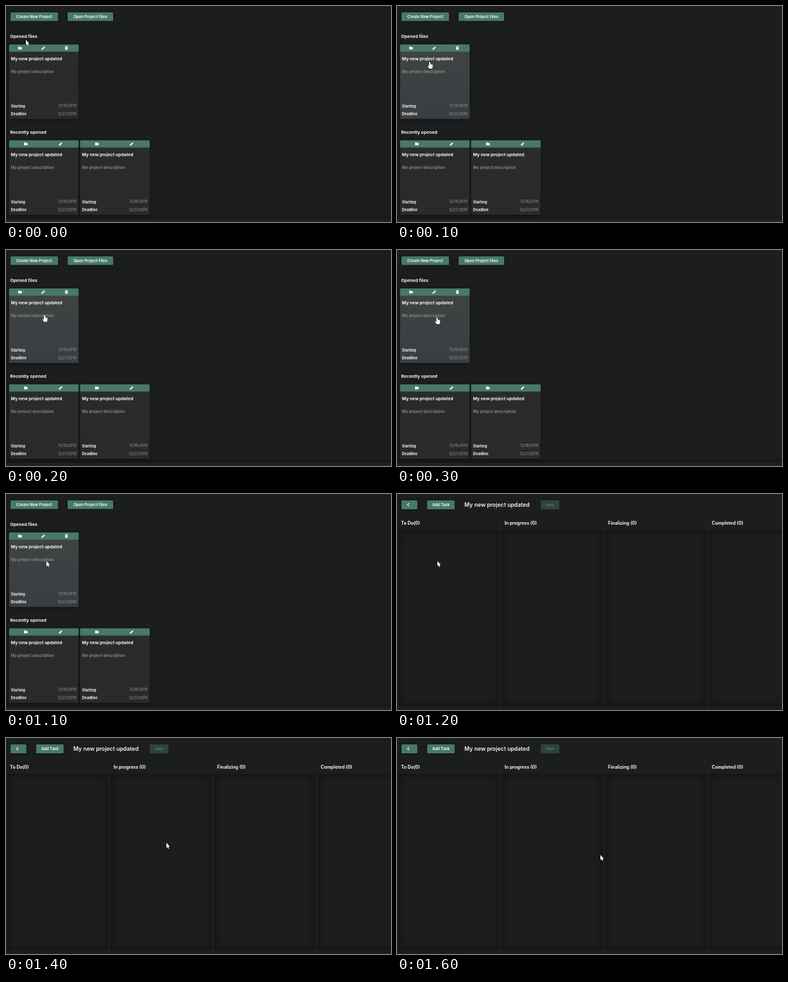
Write an HTML page with a canvas that moves like this. It is 600 px wide and 338 px high and loops after 1700 ms.

```html
<!DOCTYPE html>
<html lang="en">
<head>
<meta charset="utf-8">
<title>Project board</title>
<style>
html, body { margin: 0; width: 100%; height: 100%; overflow: hidden; background: #1c1d1e; }
canvas { display: block; width: 600px; height: 338px; }
</style>
</head>
<body>
<canvas id="stage"></canvas>
<script>
const W = 600, H = 338, LOOP = 1700;
const GREEN = '#477969', WHITE = '#f4f5f5', GREY = '#8b8e8f';
const canvas = document.getElementById('stage');
const ctx = canvas.getContext('2d');
const ratio = window.devicePixelRatio || 1;
canvas.width = W * ratio;
canvas.height = H * ratio;
ctx.scale(ratio, ratio);

// Pointer stops: time, x, y, shape
const stops = [
  [0, 31, 53, 'arrow'],
  [100, 51, 87.5, 'hand'],
  [200, 60, 102, 'hand'],
  [300, 62.5, 105.5, 'hand'],
  [1100, 63, 105, 'arrow'],
  [1300, 128, 129, 'arrow'],
  [1400, 250, 164, 'arrow'],
  [1500, 313, 180, 'arrow'],
  [1600, 317, 183, 'arrow']
];

function text(str, x, mid, size, color = WHITE, weight = 700, align = 'left') {
  ctx.font = `${weight} ${size}px Inter, "Open Sans", sans-serif`;
  ctx.fillStyle = color;
  ctx.textAlign = align;
  ctx.fillText(str, x, mid + size * 0.36);
}

function box(x, y, w, h, fill, r = 0) {
  ctx.fillStyle = fill;
  ctx.beginPath();
  ctx.roundRect(x, y, w, h, r);
  ctx.fill();
}

function shape(points, fill, x = 0, y = 0) {
  ctx.beginPath();
  for (let i = 0; i < points.length; i += 2) ctx.lineTo(x + points[i], y + points[i + 1]);
  ctx.closePath();
  ctx.fillStyle = fill;
  ctx.fill();
}

function shaded(blur, alpha, dy, draw) {
  ctx.save();
  ctx.shadowColor = `rgba(0,0,0,${alpha})`;
  ctx.shadowBlur = blur * ratio;
  ctx.shadowOffsetY = dy * ratio;
  draw();
  ctx.restore();
}

function fade(x0, y0, x1, y1, from, to) {
  const g = ctx.createLinearGradient(x0, y0, x1, y1);
  g.addColorStop(0, from);
  g.addColorStop(1, to);
  return g;
}

const icons = {
  folder(x, y) {
    shape([-2.8, -2.2, -0.5, -2.2, 0.2, -1.5, 2.8, -1.5, 2.8, 2.1, -2.8, 2.1], WHITE, x, y);
  },
  pencil(x, y) {
    shape([-2.7, 2.7, -2.7, 1.1, 0.8, -2.4, 2.4, -0.8, -1.1, 2.7], WHITE, x, y);
    shape([1.2, -2.7, 1.7, -3, 3, -1.7, 2.7, -1.2], WHITE, x, y);
  },
  trash(x, y) {
    box(x - 2.5, y - 2.6, 5, 1, WHITE);
    box(x - 0.9, y - 3, 1.8, 0.6, WHITE);
    box(x - 2, y - 1.3, 4, 4.1, WHITE, 0.5);
  }
};

function button(label, x, w, h = 13.6) {
  shaded(3, 0.45, 1, () => box(x, 10, w, h, GREEN, 1.5));
  if (label) text(label, x + w / 2, 16.7, 5.95, WHITE, 700, 'center');
}

function card(x, y, names, hover) {
  const w = 108.4, h = 116.5;
  const fill = hover ? fade(0, y, 0, y + h, '#404344', '#3b3e40')
                     : fade(0, y, 0, y + h, '#2a2b2c', '#292a2b');
  shaded(5, 0.5, 1, () => box(x, y, w, h, fill, 1.5));
  box(x, y, w, 11.3, GREEN, [1.5, 1.5, 0, 0]);
  const gap = w / names.length;
  names.forEach((name, i) => icons[name](x + gap * (i + 0.5) - 1, y + 5.6));
  text('My new project updated', x + 3, y + 22.5, 6.75);
  text('My project description', x + 3, y + 42.4, 6.15, GREY, 600);
  [['Starting', '12/18/2019', 96.3], ['Deadline', '12/27/2019', 108.8]].forEach(([label, date, dy]) => {
    text(label, x + 3, y + dy, 5.6);
    text(date, x + 104.8, y + dy, 5.5, GREY, 500, 'right');
  });
}

function home(hover) {
  box(0, 0, W, 32, fade(0, 24, 0, 33, '#1c1d1e', '#1a1b1c'));
  box(0, 33, 6, 300, fade(0, 0, 6, 0, 'rgba(0,0,0,.14)', 'rgba(0,0,0,0)'));
  box(0, 323, W, 10, fade(0, 323, 0, 333, 'rgba(0,0,0,0)', 'rgba(0,0,0,.22)'));
  box(0, 333, W, 5, '#202122');
  button('Create New Project', 7, 74);
  button('Open Project Files', 96, 71);
  text('Opened files', 6.5, 47.3, 6.85);
  card(4.8, 60.2, ['folder', 'pencil', 'trash'], hover);
  text('Recently opened', 6.5, 197.4, 6.85);
  card(4.8, 210.2, ['folder', 'pencil']);
  card(115.5, 210.2, ['folder', 'pencil']);
}

function column(label, x) {
  const y = 56, w = 157, h = 276;
  text(label, x + 4.5, 45.6, 7);
  ctx.save();
  ctx.beginPath();
  ctx.rect(x, y, w, h);
  ctx.clip();
  box(x, y, w, h, '#1c1e1e');
  // Inner shadow cast by a frame just outside the clip
  shaded(13, 0.55, 0, () => {
    ctx.strokeStyle = '#151616';
    ctx.lineWidth = 8;
    ctx.strokeRect(x - 4, y - 4, w + 8, h + 8);
  });
  ctx.restore();
}

function board() {
  button('', 7, 24.7, 14);
  ctx.strokeStyle = WHITE;
  ctx.lineWidth = 1.1;
  ctx.beginPath();
  ctx.moveTo(18.8, 14.2);
  ctx.lineTo(16.4, 16.7);
  ctx.lineTo(18.8, 19.2);
  ctx.stroke();
  button('Add Task', 47, 42.8, 14);
  text('My new project updated', 105, 17.2, 8.7, WHITE, 600);
  box(224, 10, 29, 14, '#2d443d', 1.5);
  text('save', 238.5, 16.7, 5.7, '#64786f', 600, 'center');
  ['To Do(0)', 'In progress (0)', 'Finalizing (0)', 'Completed (0)']
    .forEach((label, i) => column(label, 1.8 + i * 161.4));
}

function arrow(x, y) {
  shaded(1.5, 0.7, 0.4, () =>
    shape([0, 0, 0, 8, 1.8, 6.5, 3, 9.3, 4.3, 8.8, 3.1, 6, 5.3, 5.8], '#fff', x, y));
}

function hand(x, y) {
  shaded(1.5, 0.7, 0.4, () => {
    ctx.beginPath();
    ctx.moveTo(x - 1, y + 1);
    ctx.quadraticCurveTo(x, y - 0.8, x + 1, y + 1);
    ctx.lineTo(x + 1, y + 3.6);
    ctx.lineTo(x + 4.2, y + 4.3);
    ctx.quadraticCurveTo(x + 5, y + 4.6, x + 4.8, y + 6);
    ctx.lineTo(x + 3.9, y + 10.4);
    ctx.lineTo(x - 0.8, y + 10.4);
    ctx.lineTo(x - 3.3, y + 6.7);
    ctx.quadraticCurveTo(x - 2.9, y + 5.5, x - 1, y + 7);
    ctx.closePath();
    ctx.fillStyle = '#fff';
    ctx.fill();
  });
  ctx.strokeStyle = 'rgba(60,62,64,.45)';
  ctx.lineWidth = 0.4;
  ctx.beginPath();
  [1, 2.4, 3.7].forEach(dx => {
    ctx.moveTo(x + dx, y + 4.2);
    ctx.lineTo(x + dx, y + 6.3);
  });
  ctx.stroke();
}

function draw(t) {
  box(0, 0, W, H, '#1b1d1e');
  if (t < 1200) home(t >= 100);
  else board();
  const [, x, y, kind] = stops.filter(s => s[0] <= t).pop();
  (kind === 'hand' ? hand : arrow)(x, y);
}

const start = performance.now();
function tick() {
  draw((performance.now() - start) % LOOP);
  requestAnimationFrame(tick);
}
tick();
</script>
</body>
</html>
```
